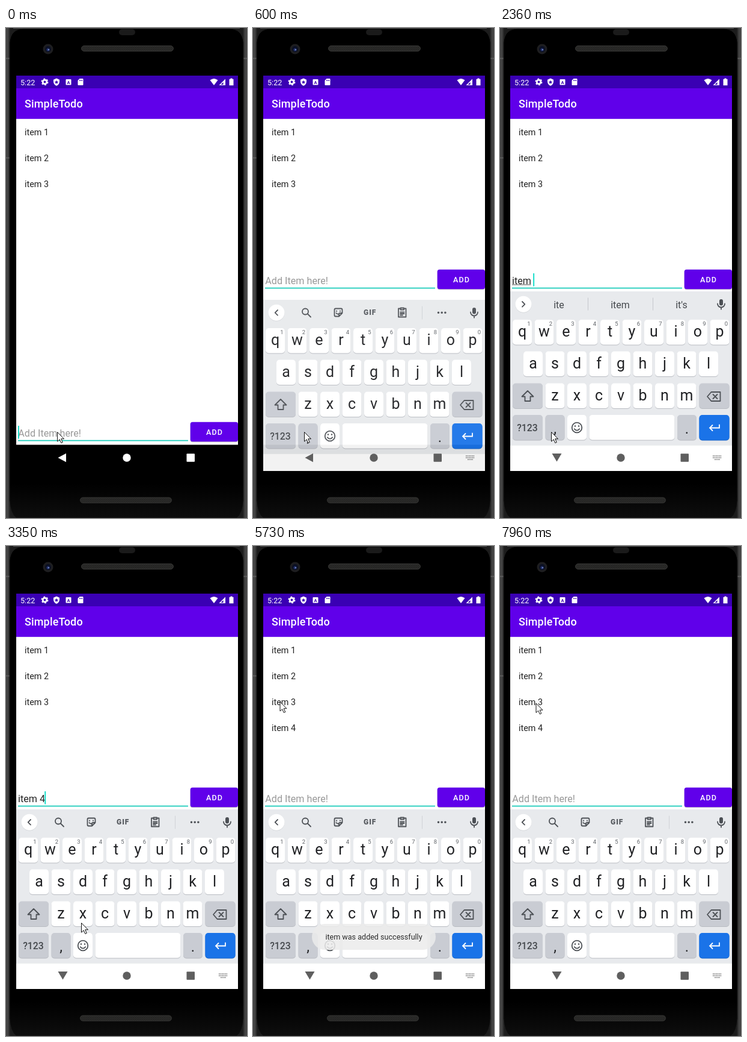
These frames come from a looping animation (401x813 px, 8 s). An HTML page:

```html
<!DOCTYPE html>
<html lang="en">
<head>
<meta charset="utf-8">
<title>To-do list</title>
<style>
html, body { margin: 0; width: 100%; height: 100%; overflow: hidden; background: #000; }
svg { display: block; width: 100vw; height: 100vh; font-family: Roboto, sans-serif; }
.mid { text-anchor: middle; }
.line { fill: none; stroke: #4d5156; stroke-width: 1.8; stroke-linejoin: round; stroke-linecap: round; }
</style>
</head>
<body>
<svg viewBox="0 0 401 813" xmlns="http://www.w3.org/2000/svg">
  <defs>
    <linearGradient id="rail">
      <stop offset="0" stop-color="#3c3c3c"/><stop offset=".007" stop-color="#474747"/>
      <stop offset=".018" stop-color="#1c1c1c"/><stop offset=".982" stop-color="#1c1c1c"/>
      <stop offset=".993" stop-color="#474747"/><stop offset="1" stop-color="#3c3c3c"/>
    </linearGradient>
    <linearGradient id="face" x2="0" y2="1">
      <stop offset="0" stop-color="#000"/><stop offset=".93" stop-color="#000"/><stop offset="1" stop-color="#0e0e0e"/>
    </linearGradient>
    <pattern id="mesh" width="3" height="3" patternUnits="userSpaceOnUse">
      <rect width="3" height="3" fill="#30302e"/><circle cx="1" cy="1" r=".8" fill="#191919"/><circle cx="2.5" cy="2.5" r=".8" fill="#191919"/>
    </pattern>
    <clipPath id="screen"><rect x="17" y="79" width="369" height="656"/></clipPath>
  </defs>

  <rect width="401" height="813" fill="url(#rail)"/>
  <path d="M0 50.5h6M395 50.5h6M0 215.500h6" stroke="#5c5c5c" stroke-width="2"/>
  <path d="M6 24Q8 1 30 1H371Q393 1 395 24V784Q394 806 384 813H17Q7 806 6 784Z" fill="url(#face)" stroke="#1c1c1c"/>
  <path d="M12 .5H389" stroke="#555"/>
  <rect x="188" y="2" width="27" height="10" rx="5" fill="#1a1a1a"/>
  <circle cx="70" cy="35" r="8.500" fill="#1e1e20"/>
  <circle cx="70" cy="35" r="5" fill="#0b1024"/>
  <circle cx="70" cy="36" r="2.500" fill="#26356f"/>
  <circle cx="71" cy="36" r="1" fill="#8a9bd0"/>
  <rect x="125.500" y="29.500" width="153" height="9" rx="4.500" fill="url(#mesh)" stroke="#353533"/>
  <rect x="123.500" y="779" width="152" height="9" rx="4.500" fill="url(#mesh)" stroke="#353533"/>

  <g clip-path="url(#screen)">
    <rect x="17" y="79" width="369" height="656"/>
    <rect x="17" y="150" width="369" height="541.500" fill="#fff"/>
    <rect x="17" y="79" width="369" height="21" fill="#3a00b3"/>
    <rect x="17" y="100" width="369" height="50.800" fill="#6000ea"/>
    <text x="31" y="132.300" font-size="18" font-weight="500" letter-spacing=".15" fill="#fff">SimpleTodo</text>

    <g fill="#fff">
      <text x="24" y="94.500" font-size="12.600">5:22</text>
      <circle cx="64.500" cy="89.500" r="3.300" fill="none" stroke="#fff" stroke-width="2.800"/>
      <circle cx="64.500" cy="89.500" r="5" fill="none" stroke="#fff" stroke-width="2" stroke-dasharray="2.600 2.636"/>
      <path d="M84 83.500l5 2.200v3.300q0 4.700-5 7-5-2.300-5-7v-3.300z"/>
      <path d="M84 86.800l1 2 2.100.2-1.600 1.400.5 2.100-2-1.100-2 1.100.5-2.100-1.600-1.400 2.100-.2z" fill="#3a00b3"/>
      <rect x="99.500" y="85" width="9" height="9.500" rx="1"/>
      <text class="mid" x="104" y="92.600" font-size="7.500" font-weight="700" fill="#3a00b3">A</text>
      <path d="M122.500 84h5q1 0 1 1v9q0 1-1 1h-7q-1 0-1-1v-7z"/>
      <path d="M122.500 86v2m2-2v2m2-2v2" stroke="#3a00b3"/>
      <path d="M339.500 86.500q6.500-5 13 0l-6.500 8.500z"/>
      <path d="M365 84.500v10.500h-10.500z"/>
      <path d="M361.500 90v4h-4z" fill="#3a00b3"/>
      <path d="M373.500 83.500h3v1.300h2v10.400h-7v-10.400h2z"/>
    </g>

    <g id="list" font-size="14.370" fill="#222"></g>

    <g id="form">
      <text id="hint" x="20.300" y="424.500" font-size="16.170" fill="#999">Add Item here!</text>
      <text id="entry" x="20" y="424.500" font-size="16.170" fill="#222" xml:space="preserve"></text>
      <rect id="compose" x="20" y="425.500" height="1" fill="#555"/>
      <rect x="20" y="430.700" width="283" height="1.700" fill="#14cbb8"/>
      <rect id="caret" y="407" width="1.800" height="21.500" fill="#03dac5"/>
      <rect x="306.700" y="402.300" width="79.300" height="32" rx="3.600" opacity=".22"/>
      <rect x="306.700" y="400.700" width="79.300" height="32.500" rx="3.600" fill="#6000ea"/>
      <rect id="press" x="306.700" y="400.700" width="79.300" height="32.500" rx="3.600" fill="#fff"/>
      <text class="mid" x="347" y="421.600" font-size="12.570" font-weight="500" letter-spacing="1.120" fill="#fff">ADD</text>
    </g>

    <g id="board">
      <rect x="17" y="437" width="369" height="255" fill="#e8eaed"/>
      <rect x="17" y="691.500" width="369" height="44" fill="#fff"/>
      <circle cx="39" cy="459" r="13.500" fill="#cfd2d6"/>
      <circle cx="39" cy="458.300" r="13.500" fill="#fff"/>
      <path id="chevron" class="line"/>
      <g id="tools" class="line">
        <circle cx="87" cy="456.500" r="5"/><path d="M91 460.500l5 5"/>
        <path d="M137.500 451.500h9q2 0 2 2v5.500l-5.500 5.500h-5.500q-2 0-2-2v-9q0-2 2-2zM148.500 459h-3.500q-2 0-2 2v3.500M139 455.500v.5m6-.5v.5M138.500 459q1.500 2 3.500 1.500"/>
        <text class="mid" x="194.700" y="462.300" font-size="12" font-weight="900" letter-spacing="1" fill="#55595e" stroke="none">GIF</text>
        <path d="M245 451.500h-3v14h12.500v-14h-3M245.500 450.500h5.500v3h-5.500zM245 457.500h6.500m-6.500 2.500h6.500m-6.500 2.500h4"/>
        <path d="M281.500 448v21" stroke="#cfd2d6" stroke-width="1"/>
        <path d="M308.500 458.300h0m5.700 0h0m5.700 0h0" style="stroke-width: 3.600"/>
      </g>
      <g id="words" class="mid" font-size="16" fill="#44484c">
        <path d="M146.500 447.500v21m108-21v21" stroke="#c4c7cc"/>
        <text x="98" y="464.500"></text><text x="200" y="464.500"></text><text x="302" y="464.500"></text>
      </g>
      <rect x="365" y="450" width="6" height="10.500" rx="3" fill="#4b4f54"/>
      <path class="line" d="M362 457.500a6 6 0 0 0 12 0M368 463.700v3"/>
      <g id="keys"></g>
      <g class="line">
        <path d="M46 602l9.500 9.500h-5v7.500h-9v-7.500h-5z"/>
        <path d="M351.500 604h15v15h-15l-6.500-7.500zM354.500 608l7 7m0-7l-7 7"/>
        <circle cx="128" cy="663" r="8.300"/>
        <path d="M125 660.500h0m6 0h0" stroke-width="2.600"/><path d="M123.700 665.200q4.300 5 8.600 0"/>
        <path d="M365 658.500v5h-16m4.500-4.500l-4.500 4.500 4.500 4.500" stroke="#fff" stroke-linejoin="miter"/>
      </g>
      <path d="M17 692h369" stroke="#dcdfe2"/>
    </g>

    <g id="nav">
      <path id="back"/>
      <circle cx="201" cy="713" r="6.700"/>
      <rect x="300.500" y="706.300" width="13.500" height="13.500" rx="1"/>
      <path id="dots" d="M354 710h14.500M354 713h14.500M357 716h9" fill="none" stroke-width="1.700" stroke-dasharray="1.700 .8"/>
    </g>

    <g id="toast">
      <rect x="98" y="627" width="206" height="43" rx="21.500" fill="#ececec" fill-opacity=".86"/>
      <text class="mid" x="201" y="653" font-size="12.570" fill="#2b2b2b">item was added successfully</text>
    </g>
  </g>

  <path id="mouse" d="M.5 .5v15.500l3.700-3.300 2.600 5.800 2.500-1.100-2.600-5.700h4.800z" fill="#fff" stroke="#111"/>
</svg>

<script>
const LOOP = 8000;
const $ = id => document.getElementById(id);
const set = (el, attrs) => { for (const k in attrs) el.setAttribute(k, attrs[k]); return el; };
const add = (parent, tag, attrs, text = '') => {
  const el = set(document.createElementNS('http://www.w3.org/2000/svg', tag), attrs);
  el.textContent = text;
  return parent.appendChild(el);
};

// Screen refresh moments.
const ticks = [0, 150, 300, 450, 600, 720, 840, 1150, 1580, 1720, 1850, 1980, 2110, 2240, 2360, 2520, 2670,
  3080, 3230, 3380, 3530, 3670, 3810, 3940, 4080, 4230, 4480, 4620, 4760, 4900, 5040, 5180,
  5460, 5600, 5730, 5880, 6010, 6150, 6290, 6420, 6570, 6710, 6850, 7000, 7140, 7540, 7680, 7820, 7960];

const typed = [[0, ''], [1150, 'i'], [1720, 'it'], [1980, 'ite'], [2240, 'item'], [2360, 'item '], [3080, 'item 4'], [4480, '']];
const hints = [[0, ''], [1580, "I'm I in"], [1850, "it it's if"], [2110, "ite item it's"],
  [2520, 'items item itemized'], [2670, 'is and in'], [3080, '']];
const path = [[3080, 85, 670], [3530, 205, 535], [3810, 340, 390], [3940, 350, 408], [4080, 352, 416], [4620, 352, 416],
  [5180, 230, 340], [5460, 80, 275], [5600, 48, 260], [5730, 44.5, 258], [6420, 44.5, 258],
  [7140, 101, 272], [7400, 101, 272], [7960, 59.5, 260.5]];
const slide = [[300, 254, 0], [450, 221, .13], [600, 14, .95], [720, 0, 1]];
const ripple = [[3940, 0], [4080, .12], [4230, .23], [4480, .19], [4760, 0]];
const fade = [[4620, 0], [4900, 1], [6420, 1], [7000, 0]];

const last = (track, t) => track.filter(k => k[0] <= t).pop();
function mix(track, t) {
  const i = track.findIndex(k => k[0] > t);
  if (i < 1) return (i ? track[track.length - 1] : track[0]).slice(1);
  const a = track[i - 1], b = track[i], p = (t - a[0]) / (b[0] - a[0]);
  return a.slice(1).map((v, n) => v + (b[n + 1] - v) * p);
}

function key(x, y, w, fill, edge = '#b9bcc2') {
  add($('keys'), 'rect', { x, y: y + 1, width: w, height: 41.5, rx: 5, fill: edge });
  add($('keys'), 'rect', { x, y, width: w, height: 41.5, rx: 5, fill });
}
function label(x, y, text, size = 25, fill = '#202124', weight = 400) {
  add($('keys'), 'text', { x, y, fill, 'class': 'mid', 'font-size': size, 'font-weight': weight }, text);
}

const PITCH = 36.5, GREY = '#c9ccd3';
[['qwertyuiop', 37, 484], ['asdfghjkl', 55, 536.5], ['zxcvbnm', 91.5, 589.5]].forEach(([row, x0, y], r) => {
  [...row].forEach((c, i) => {
    const x = x0 + i * PITCH;
    key(x - 16, y, 32, '#fff');
    label(x, y + 28.2, c);
    if (!r) label(x + 11, y + 10, (i + 1) % 10, 9.5, '#5f6368');
  });
});
key(21, 589.5, 50, GREY);
key(331.5, 589.5, 50, GREY);
[[21, 50, GREY], [75.5, 32, GREY], [112, 32, '#fff'], [148.5, 142, '#fff'], [295, 32, GREY], [331.5, 50, '#1a73e8', '#1a66c8']]
  .forEach(([x, w, fill, edge]) => key(x, 642, w, fill, edge));
label(45.5, 669, '?123', 15.8, '#44484c', 500);
label(91.5, 672.5, ',', 24);
label(311, 672.5, '.', 24);

const items = [1, 2, 3, 4].map(n => add($('list'), 'text', { x: 31, y: 134.5 + n * 43.1 }, 'item ' + n));
const slots = $('words').querySelectorAll('text');
const show = (el, on) => el.setAttribute('visibility', on ? 'visible' : 'hidden');

function caretOn(t) {
  if (t < 840) return t < 150;
  if (t < 4480) return t < 3530 || t >= 4040;
  return (t - 4540) % 1000 >= 500 || t < 4540;
}

function draw(time) {
  const t = ticks.filter(k => k <= time).pop();
  const up = t >= 600;

  const [drop, alpha] = mix(slide, t);
  set($('board'), { transform: `translate(0 ${drop})`, opacity: alpha });
  set($('form'), { transform: `translate(0 ${up ? 0 : 253})` });

  const text = last(typed, t)[1];
  show($('hint'), !text);
  $('entry').textContent = text;
  const width = text ? $('entry').getComputedTextLength() : 0;
  set($('caret'), { x: Math.max(20, 19.3 + width) });
  show($('caret'), caretOn(t));
  show($('compose'), text && t < 2670);
  set($('compose'), { width: Math.min(width, 31.5) });

  const words = last(hints, t)[1];
  show($('words'), words);
  show($('tools'), !words);
  words.split(' ').forEach((w, i) => slots[i].textContent = w);
  set($('chevron'), { d: words ? 'M37 454l4.300 4.300-4.300 4.300' : 'M41 454l-4.300 4.300 4.300 4.300' });

  set($('nav'), { fill: up ? '#5f5f5f' : '#fff' });
  set($('dots'), { stroke: up ? '#777' : '#fff' });
  show($('dots'), t >= 450);
  set($('back'), { d: t < 840 ? 'M86.500 713l13.500-7.200v14.400z' : 'M86.500 706h16l-8 13.500z' });

  show(items[3], t >= 4480);
  set($('press'), { opacity: mix(ripple, t)[0] });
  set($('toast'), { opacity: mix(fade, t)[0] });
  set($('mouse'), { transform: `translate(${mix(path, t)})` });
}

const start = performance.now();
function frame() {
  draw((performance.now() - start) % LOOP);
  requestAnimationFrame(frame);
}
frame();
</script>
</body>
</html>
```
